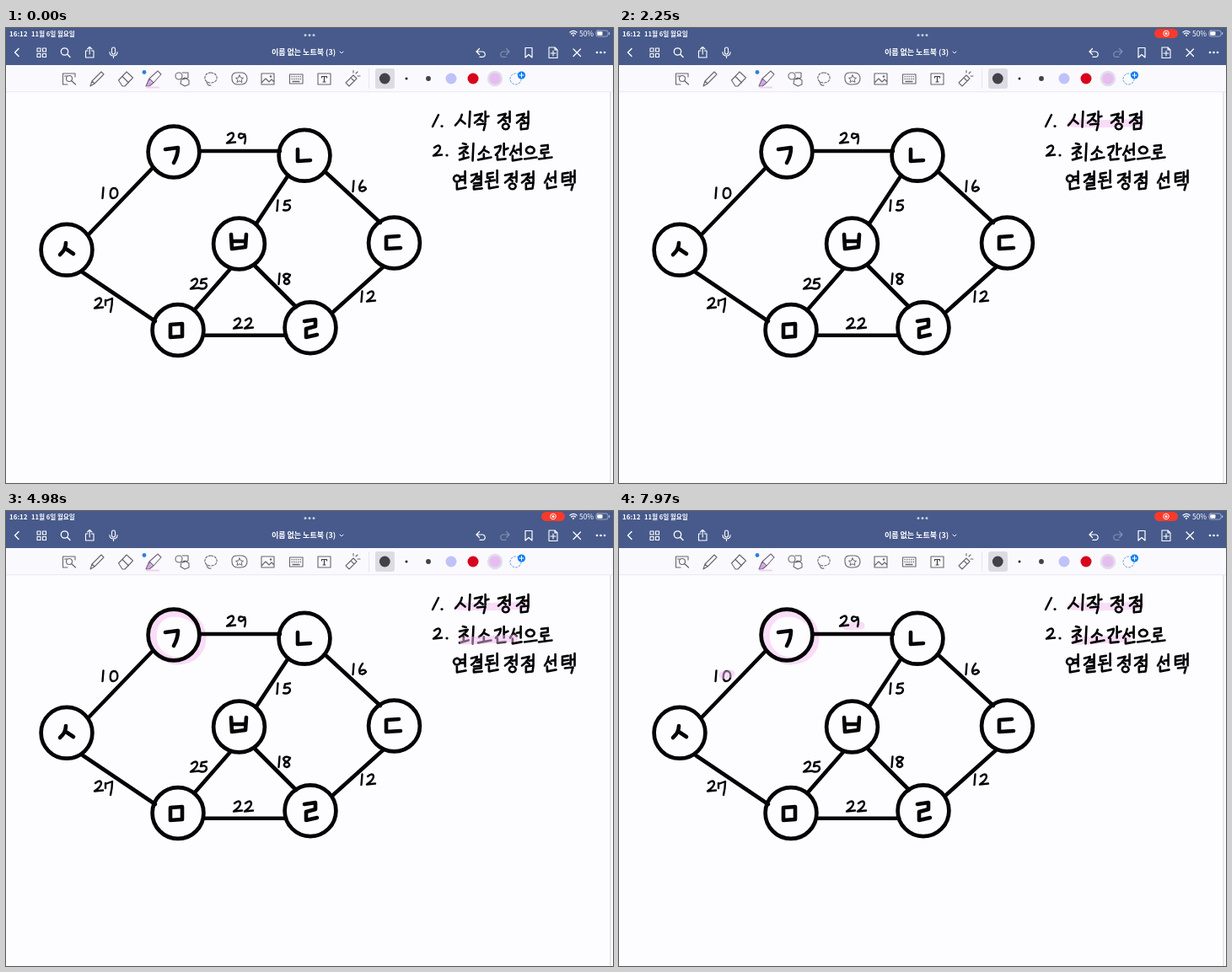
These frames come from a looping animation (720 by 540 pixels, 8 s). An HTML page with a canvas:

```html
<!DOCTYPE html>
<html lang="ko">
<head>
<meta charset="utf-8">
<style>
html, body { margin: 0; width: 100%; height: 100%; overflow: hidden; background: #fdfcff; }
canvas { display: block; width: 720px; height: 540px; }
</style>
</head>
<body>
<canvas id="stage" width="720" height="540"></canvas>
<script>
const ctx = document.getElementById('stage').getContext('2d');
const LOOP = 8000;
const FONT = '"Noto Sans CJK KR", "Noto Sans CJK", "Noto Sans", sans-serif';
const INK = '#040405', BAR = '#475a8b', PAPER = '#fdfcff', PINK = '#f9dcf8';

function line(d, color = INK, width = 1, fill = false) {
  const path = new Path2D(d);
  ctx.lineCap = ctx.lineJoin = 'round';
  if (fill) { ctx.fillStyle = color; ctx.fill(path); return; }
  ctx.strokeStyle = color;
  ctx.lineWidth = width;
  ctx.stroke(path);
}

function at(x, y, draw, scale = 1) {
  ctx.save();
  ctx.translate(x, y);
  ctx.scale(scale, scale);
  draw();
  ctx.restore();
}

function disc(x, y, r, color) {
  ctx.fillStyle = color;
  ctx.beginPath();
  ctx.arc(x, y, r, 0, Math.PI * 2);
  ctx.fill();
}

function ring(x, y, r, color, width) {
  ctx.strokeStyle = color;
  ctx.lineWidth = width;
  ctx.beginPath();
  ctx.arc(x, y, r, 0, Math.PI * 2);
  ctx.stroke();
}

function box(x, y, w, h, r, color) {
  ctx.fillStyle = color;
  ctx.beginPath();
  ctx.roundRect(x, y, w, h, r);
  ctx.fill();
}

function label(text, x, y, size, weight = 400, align = 'left', color = '#fff') {
  ctx.font = `${weight} ${size}px ${FONT}`;
  ctx.textAlign = align;
  ctx.textBaseline = 'alphabetic';
  ctx.fillStyle = color;
  ctx.fillText(text, x, y);
}

// Handwritten glyphs, each in a box of about 18 by 22
const HAND = {
  '시': 'M9 5Q8 11 1 18M7 11L13 16M19 1L18 20',
  '작': 'M1 6L10 4Q8 10 1 15M6 10L11 13M14 1V14M14 8L18 7M4 17L14 16L12 24',
  '정': 'M1 6L10 4Q8 10 1 15M6 10L10 13M10 9L15 8M15 1V14M10 16a4 3.5 0 1 0 .1 0',
  '점': 'M1 6L10 4Q8 10 1 15M6 10L10 13M10 9L15 8M15 1V14M6 16L15 15L14 22L6 23Z',
  '최': 'M5 1L9 2M1 7L11 5Q8 10 1 14M6 10L11 13M6 14V19M1 21L12 18M18 1L17 22',
  '소': 'M9 4Q8 9 2 13M8 8L14 11M8 13V18M1 20L17 17',
  '간': 'M1 6L8 4Q8 10 2 15M12 1V15M12 9L17 7M4 16V21L14 20',
  '선': 'M6 4Q5 10 1 15M5 9L9 13M9 9L14 8M14 1V15M4 16V22L15 20',
  '으': 'M8 4a5 4.2 0 1 0 .1 0M1 19L16 17',
  '로': 'M4 3L12 2V7L4 8V12L13 11M8 12V17M1 19L17 17',
  '연': 'M5 5a4 4 0 1 0 .1 0M9 7L15 6M9 11L15 10M15 0V15M5 15V22L16 20',
  '결': 'M1 5L8 3Q7 9 1 13M8 7L13 6M8 10L13 9M13 0V13M4 15L13 14V17L4 18V22L14 21',
  '된': 'M9 3L2 4V9L9 8M5 9V13M0 14L11 12M14 0V15M4 16V22L15 20',
  '택': 'M8 3L1 4V14L9 12M1 9L8 8M11 2V14M11 8L16 7M16 0V15M4 18L14 17L12 24'
};

// Digits in a box of about 10 by 13
const DIGIT = {
  0: 'M5 1C0 1-1 13 4 13C11 13 11 1 5 1',
  1: 'M2.5 0.5L1.5 13',
  2: 'M1 3Q7-2 8 3Q8 7 0 12.5L10 11.5',
  5: 'M9 0.5L3 1.5L2 6Q9 4 9 9Q7 14 1 12',
  6: 'M5 0Q-1 8 2 12Q6 14 9 10Q8 6 2 9',
  7: 'M1 3V9M1 4L9 1Q9 9 7 17',
  8: 'M9 2Q3-1 1 3Q2 6 7 8Q10 12 5 13Q0 12 3 8Q8 5 9 2',
  9: 'M8 3Q1-1 1 5Q3 9 8 4M8 2Q10 7 8 13'
};

const NOTE = [
  ['시', 532, 98], ['작', 555, 98], ['정', 583, 98], ['점', 605, 98],
  ['최', 537, 136], ['소', 559, 137], ['간', 579, 136], ['선', 597, 136], ['으', 614, 137], ['로', 631, 137],
  ['연', 530, 170], ['결', 551, 170], ['된', 569, 169],
  ['정', 591, 169], ['점', 611, 169], ['선', 638, 169], ['택', 659, 169]
];

const NODES = [
  [199, 147, 'M189 144L204 142Q204 151 199 160'],
  [354, 151.3, 'M346 144V158L361 157'],
  [276.5, 256, 'M267 245L268 262L284 260L285 245M268 253H284'],
  [460.5, 255, 'M466 247L451 248V262L468 261'],
  [72, 263.3, 'M71 255Q71 263 64 269M71 262L80 268'],
  [204, 358.5, 'M195 352V367M195 352L209 351V366L195 367'],
  [361, 355.7, 'M354 348L367 346V354L356 357V367L369 364']
];
const EDGES = 'M229 146H325M174 166L98 245M91 290L177 348M334 176L297 232M379 171L444 231' +
  'M266 286L224 334M295 282L344 331M235 364.8H332M448 283L388 337';
const WEIGHTS = [
  ['29', 262, 124, 13], ['10', 113, 189, 10], ['15', 320, 204, 8], ['16', 410, 181, 8], ['18', 322, 291, 6],
  ['12', 420, 312, 8], ['22', 270, 344, 13], ['25', 219, 297, 10], ['27', 105, 320, 12]
];

// Highlighter strokes: start, end, moment of settling under the ink, path
const MARKS = [
  { from: 1200, to: 1950, settle: 2100, d: 'M537 113Q575 115 618 112', len: 82 },
  { from: 2500, to: 3350, settle: 3500, d: 'M200 121C165 121 165 176 203 178C244 178 243 122 200 121', len: 184 },
  { from: 4350, to: 4930, settle: 5080, d: 'M542 154Q570 153 603 151', len: 62 },
  { from: 7280, to: 7520, settle: 7670, d: 'M270 137L287 136', len: 18 },
  { from: 7830, to: 8010, settle: 8160, d: 'M123 195L133 193', len: 11 }
];

function drawMarks(t, live) {
  for (const m of MARKS) {
    if (t < m.from || (t < m.settle) !== live) continue;
    const k = Math.min(1, (t - m.from) / (m.to - m.from));
    const p = k * k * (3 - 2 * k);
    ctx.save();
    if (live) ctx.globalAlpha = 0.5;
    ctx.setLineDash([Math.max(0.1, p * m.len * 1.1), 400]);
    line(m.d, live ? '#f2baf0' : PINK, 9);
    ctx.restore();
  }
}

function drawGraph() {
  line(EDGES, INK, 4.6);
  for (const [x, y, letter] of NODES) {
    ring(x, y, 30.4, INK, 4.7);
    line(letter, INK, 4.6);
  }
  for (const [text, x, y, step] of WEIGHTS)
    [...text].forEach((c, i) => at(x + i * step, y, () => line(DIGIT[c], INK, 2.4)));
}

function drawNote() {
  line('M513 103L506 117', INK, 2.5);
  disc(517, 116.5, 1.6, INK);
  at(507, 139, () => line(DIGIT[2], INK, 2.5));
  disc(523, 151, 1.6, INK);
  for (const [c, x, y] of NOTE) at(x, y, () => line(HAND[c], INK, 2.7), 0.97);
}

function drawStatus(t) {
  label('16:12', 4, 9.5, 8, 700);
  label('11월 6일 월요일', 30, 9.5, 7.6, 700);
  for (const x of [355, 360, 365]) disc(x, 8.5, 1.5, '#c5cce0');
  if (t >= 400) {
    box(635, 1, 28, 11, 5.5, '#f63a2c');
    ring(649, 6.5, 3.3, '#fff', 0.9);
    disc(649, 6.5, 1.5, '#fff');
  }
  line('M669 5Q673 1.8 677 5M670.5 7Q673 4.8 675.5 7', '#fff', 1.3);
  disc(673, 8.8, 1.1, '#fff');
  label('50%', 680, 9.7, 8.4, 500);
  ctx.strokeStyle = '#b4bdd4';
  ctx.lineWidth = 0.8;
  ctx.beginPath();
  ctx.roundRect(700, 3, 14, 7, 2);
  ctx.stroke();
  box(701.2, 4.2, 6.3, 4.6, 1, '#fff');
  box(715, 5, 1.2, 3, 0.5, '#b4bdd4');
}

function drawNav() {
  const w = '#fff';
  line('M15 24.5L10.5 29L15 33.5', w, 1.4);
  for (const x of [37, 43.5]) for (const y of [24, 30.5]) line(`M${x} ${y}h4v4h-4Z`, w, 1.1);
  ring(69.5, 28, 4.2, w, 1.3);
  line('M72.8 31.3L76 34.5', w, 1.4);
  line('M97 27H94.5V35H104V27H101.5M99.2 31V22.5M96.5 25L99.2 22.5L102 25', w, 1.1);
  line('M125.5 25a2 2 0 0 1 4 0v4a2 2 0 0 1-4 0ZM123 28.5Q123 33 127.5 33Q132 33 132 28.5M127.5 33V35.5', w, 1.1);
  label('이름 없는 노트북 (3)', 353, 32, 9, 700, 'center');
  line('M396 28L398 30L400 28', w, 1);
  line('M561.5 24.5L558 28L561.5 31.5M558 28H565a3.2 3.2 0 0 1 0 6.4H562', w, 1.2);
  line('M593.5 24.5L597 28L593.5 31.5M597 28H590a3.2 3.2 0 0 0 0 6.4H593', '#8190b3', 1.2);
  line('M616 23.5H624V35L620 31.5L616 35Z', w, 1.2);
  line('M644 23H651L654 26V35.5H644ZM651 23V26H654M649 27V33M646 30H652', w, 1.1);
  line('M673 25L681.5 33.5M681.5 25L673 33.5', w, 1.3);
  for (const x of [701, 705.5, 710]) disc(x, 29, 1.3, w);
}

function drawTools() {
  const g = '#67666d';
  ctx.fillStyle = '#faf9fd';
  ctx.fillRect(0, 44, 720, 32);
  ctx.fillStyle = '#e8e7ee';
  ctx.fillRect(0, 75.3, 720, 0.9);

  line('M73 67H67.5V54H82V58M69.5 57H72', g, 1.1);
  ring(75, 60, 3.5, g, 1.1);
  line('M77.5 62.5L82.5 67', g, 1.3);
  line('M100 69L102 63L113 52L116 55L105 66ZM102 63L105 66', g, 1.1);
  line('M133.5 62L143 52L150.5 59L141 69H138ZM138 57.5L145.5 65', g, 1.1);
  line('M169 60L174 66L170 69H166Z', '#d3a6e6', 1, true);
  line('M166 69L170 60L180 51L184 55L175 65L170 69ZM170 60L175 65', '#77677f', 1.1);
  line('M167 70.5H181', '#ecd3f3', 2);
  disc(164, 52.5, 2.4, '#2f7fdc');
  ring(205, 57, 4, g, 1.1);
  line('M209 53H216V59L210 61M208 61L212 59L217 62V67L212 69L207 66Z', g, 1.1);
  ctx.setLineDash([2.5, 1.8]);
  line('M243 53C234 53 233 65 243 65C253 65 252 53 243 53', g, 1.1);
  ctx.setLineDash([]);
  line('M238 64Q239 69 243 68', g, 1.1);
  line('M268 57Q269 53 274 53H280Q286 54 286 60Q286 67 278 67H274Q268 66 268 60Z', g, 1.1);
  line('M277 56L278.5 59L281.5 59.3L279.2 61.3L280 64.5L277 62.8L274 64.5L274.8 61.3L272.5 59.3L275.5 59Z', g, 1);
  line('M303 54H318V67H303ZM303 65L308 60L312 64L315 61L318 64', g, 1.1);
  disc(314, 57.5, 1.2, g);
  line('M336.5 55H352V66H336.5Z', g, 1.1);
  line('M340 63.5H348', g, 1.3);
  for (let i = 0; i < 10; i++) disc(339.2 + i % 5 * 2.5, 57.8 + Math.floor(i / 5) * 2.7, 0.8, g);
  line('M370 54H385V67H370Z', g, 1.1);
  line('M374.5 59V57.5H380.5V59M377.5 57.5V64M376 64H379', '#3c3c42', 1.2);
  line('M403 65L412 56L416 60L407 69ZM409 59L413 63', g, 1.1);
  line('M415 54L417 52M417 57H420M412 53V50.5', g, 1.1);

  ctx.fillStyle = '#e3e2e9';
  ctx.fillRect(430, 48, 0.8, 24);
  box(438, 48, 23, 24, 3, '#dddce5');
  disc(449.3, 60, 6.4, '#424247');
  disc(475, 60, 1.5, '#222226');
  disc(501, 60, 2.9, '#424247');
  disc(528, 60, 6.5, '#bfc2f8');
  disc(554, 60, 6.5, '#d8041c');
  disc(580, 60, 9.2, '#e0dde8');
  disc(580, 60, 6.6, '#e6bdf0');
  ctx.setLineDash([2, 2]);
  ring(604.5, 60.5, 6.5, '#5f9fdc', 1);
  ctx.setLineDash([]);
  disc(611.5, 56, 4.6, '#0d7cf0');
  line('M609 56H614M611.5 53.5V58.5', '#fff', 1);
}

function draw(t) {
  ctx.fillStyle = PAPER;
  ctx.fillRect(0, 0, 720, 540);
  ctx.fillStyle = '#e8e7ed';
  ctx.fillRect(716, 76, 2, 464);
  drawMarks(t, false);
  drawGraph();
  drawNote();
  drawMarks(t, true);
  drawTools();
  ctx.fillStyle = BAR;
  ctx.fillRect(0, 0, 720, 44);
  drawStatus(t);
  drawNav();
}

const start = performance.now();
function tick() {
  draw((performance.now() - start) % LOOP);
  requestAnimationFrame(tick);
}
tick();
</script>
</body>
</html>
```
